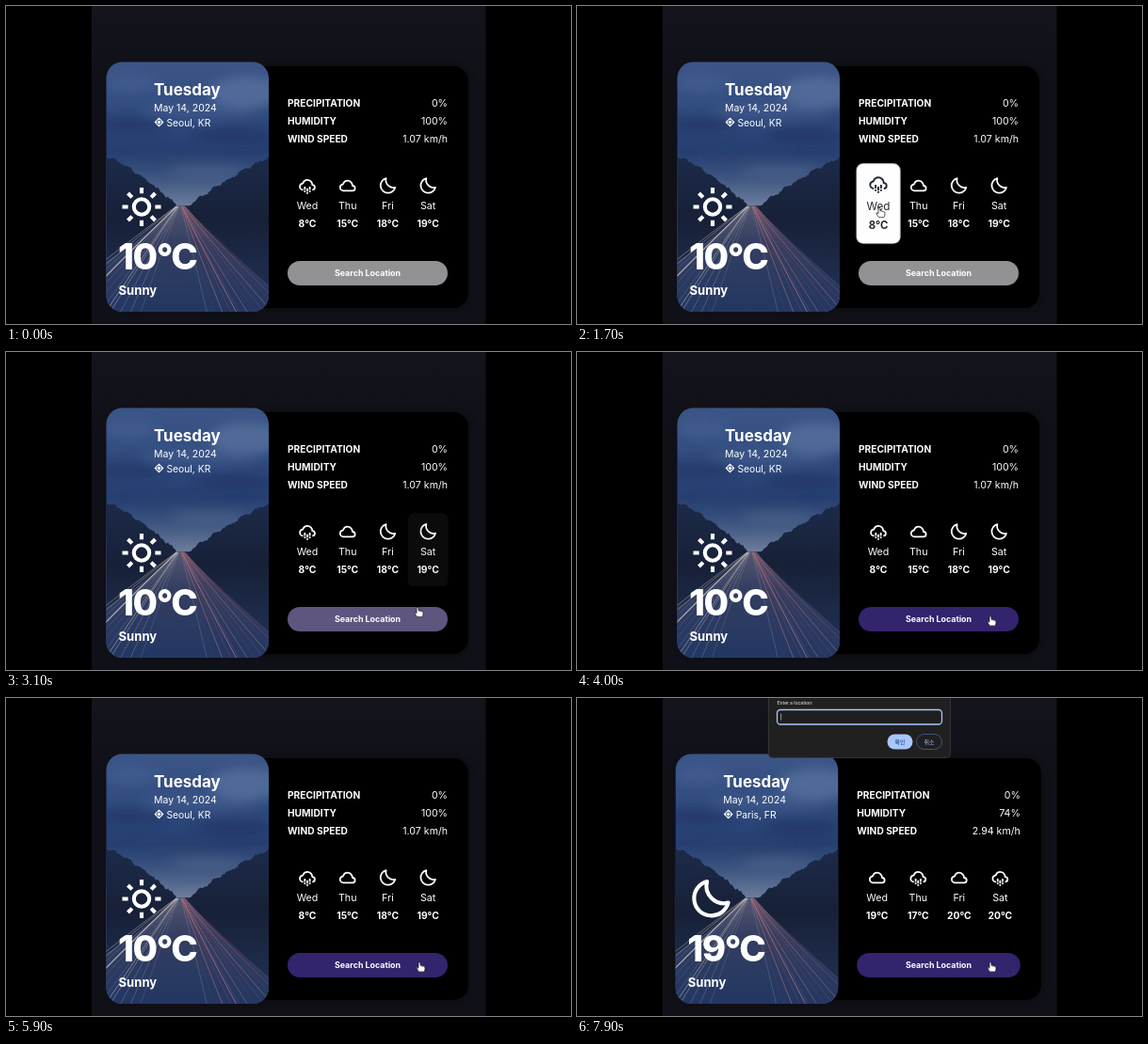
Write an HTML page that moves like this. It is 600 by 338 pixels and loops after 8000 ms.

```html
<!DOCTYPE html>
<html lang="en">
<head>
<meta charset="utf-8">
<title>Weather card</title>
<style>
html, body { margin: 0; width: 100%; height: 100%; overflow: hidden; background: #000; }
svg { display: block; width: 100vw; height: 100vh; font: 10.4px Inter, sans-serif; }
text { white-space: pre; }
.b { font-weight: 700; }
.mid { text-anchor: middle; }
.end { text-anchor: end; }
.icon { fill: none; stroke: currentColor; stroke-width: 2; stroke-linejoin: round; }
.dialog, .dialog text { font-family: Roboto, "Noto Sans CJK KR", "Noto Sans CJK", sans-serif; }

.before, .after, .dialog, .arrow, .hand { animation: 8s step-end infinite; }
.before { animation-name: before; }
.after { visibility: hidden; animation-name: after; }
.dialog { visibility: hidden; animation-name: dialog; }
.caret { animation: caret 8s step-end infinite; }
.key { visibility: hidden; animation: key 8s step-end var(--d) infinite; }
.before .card { transform-origin: 192.5px 192px; animation: grow 8s infinite; }
.before .item { animation: item 8s var(--d) infinite; }
.before .tile { animation: tile 8s var(--d) infinite; }
.tile { fill: #fff; opacity: 0; }
.before .button { animation: button 8s infinite; }
.button { fill: #34236d; }
.cursor { animation: move 8s linear infinite; }
.arrow { animation-name: arrow; }
.hand { animation-name: hand; }

@keyframes before { 0% { visibility: visible } 74.5%, 100% { visibility: hidden } }
@keyframes after { 0% { visibility: hidden } 74.5%, 100% { visibility: visible } }
@keyframes dialog {
  0% { visibility: hidden } 52.5% { visibility: visible }
  71% { visibility: hidden } 93.75%, 100% { visibility: visible }
}
@keyframes caret { 0% { opacity: 1 } 59.2% { opacity: 0 } 62.5%, 100% { opacity: 1 } }
@keyframes key { 0% { visibility: inherit } 10%, 100% { visibility: hidden } }
@keyframes grow { 0%, 2.5% { transform: none } 6.25%, 15.75% { transform: scale(1.078) } 19.5%, 100% { transform: none } }
@keyframes item {
  0% { transform: none; color: #fff }
  2.5%, 4.75% { transform: scale(1.1); color: #222831 }
  7.25%, 100% { transform: none; color: #fff }
}
@keyframes tile { 0% { opacity: 0 } 2.5%, 4.75% { opacity: 1 } 7.25%, 100% { opacity: 0 } }
@keyframes button { 0%, 37.6% { fill: #929295 } 41.3%, 100% { fill: #34236d } }
@keyframes arrow { 0% { visibility: hidden } 2% { visibility: visible } 18.5%, 100% { visibility: hidden } }
@keyframes hand { 0% { visibility: hidden } 18.5%, 100% { visibility: visible } }
@keyframes move {
  0%, 2% { transform: translate(226px, 160px) }
  8% { transform: translate(192px, 192px) }
  13.5% { transform: translate(204px, 205px) }
  16% { transform: translate(280px, 214px) }
  19% { transform: translate(317px, 214px) }
  21.25%, 22.5% { transform: translate(321px, 214px) }
  24% { transform: translate(345px, 217px) }
  28% { transform: translate(388px, 218px) }
  31.25% { transform: translate(438px, 217px) }
  35% { transform: translate(443px, 224px) }
  38.75% { transform: translate(437px, 271px) }
  44%, 100% { transform: translate(439px, 280.5px) }
}
</style>
</head>
<body>
<svg viewBox="0 0 600 338" fill="#fff" color="#fff">
  <defs>
    <linearGradient id="page" x2="0" y2="1"><stop stop-color="#14151c"/><stop offset=".25" stop-color="#101118"/><stop offset="1" stop-color="#101118"/></linearGradient>
    <linearGradient id="sky" x2="0" y2="1">
      <stop stop-color="#3c5587"/><stop offset=".16" stop-color="#344e81"/>
      <stop offset=".36" stop-color="#263f71"/><stop offset=".46" stop-color="#3c547f"/>
      <stop offset=".57" stop-color="#6b7c9b"/>
    </linearGradient>
    <linearGradient id="road" x2="0" y2="1"><stop stop-color="#545872"/><stop offset=".35" stop-color="#343e60"/><stop offset="1" stop-color="#223763"/></linearGradient>
    <linearGradient id="woods" x2="0" y2="1"><stop stop-color="#1c2b4a"/><stop offset=".4" stop-color="#172037"/><stop offset="1" stop-color="#22345a"/></linearGradient>
    <filter id="soft" x="-50%" y="-100%" width="200%" height="300%"><feGaussianBlur stdDeviation="6"/></filter>
    <filter id="shade" x="-20%" y="-20%" width="140%" height="140%"><feGaussianBlur stdDeviation="4"/></filter>
    <clipPath id="round"><rect x="106.5" y="59.5" width="172.5" height="265.5" rx="17"/></clipPath>
    <g id="photo" clip-path="url(#round)">
      <path fill="url(#sky)" d="M106 59h174v267H106z"/>
      <g filter="url(#soft)">
        <ellipse cx="256" cy="92" rx="40" ry="17" fill="#6480aa" opacity=".55"/>
        <ellipse cx="132" cy="82" rx="30" ry="9" fill="#4c669a" opacity=".45"/>
        <ellipse cx="205" cy="112" rx="60" ry="7" fill="#5470a0" opacity=".35"/>
        <ellipse cx="130" cy="126" rx="42" ry="9" fill="#1e3565" opacity=".6"/>
        <ellipse cx="242" cy="138" rx="42" ry="9" fill="#1d3565" opacity=".6"/>
        <ellipse cx="180" cy="160" rx="54" ry="5" fill="#2a4270" opacity=".55"/>
        <ellipse cx="215" cy="176" rx="40" ry="5" fill="#63779c" opacity=".45"/>
      </g>
      <path id="trees" fill="url(#woods)"/>
      <path fill="url(#road)" d="M181 212Q155 242 106 272V326H280V298Q215 243 190 212z"/>
      <g id="trails" fill="none"/>
    </g>
    <g id="sun" class="icon"><circle r="4"/><path id="rays"/></g>
    <path id="moon" class="icon" d="M-2-9A9 9 0 1 0 9 2A9 9 0 0 1-2-9z"/>
    <path id="cloud" class="icon" d="M-5 6A4 4 0 0 1-9 2C-9 .3-7.700-1.400-5.300-1.900C-4.600-4-2.500-6 0-6A6 6 0 0 1 6 0A3 3 0 0 1 6 6z"/>
    <path id="rain" class="icon" d="M-5 5A4 4 0 0 1-9 1C-9-.7-7.700-2.400-5.300-2.900C-4.600-5-2.500-7 0-7A6 6 0 0 1 6-1A3 3 0 0 1 6 5M-3 1v4m0 1v2M3 1v4m0 1v2M0 3v4m0 1v2"/>
  </defs>
  <path fill="#000" d="M0 0h600v338H0z"/>
  <path fill="url(#page)" d="M91 0h418.500v338H91z"/>
  <g id="scenes"></g>
  <g class="dialog">
    <rect x="203.500" y="-9" width="193" height="72.500" rx="4" fill="#202020" stroke="#3b3b3d" stroke-width=".8"/>
    <text x="212.500" y="7" font-size="5.300" fill="#e3e3e3">Enter a location:</text>
    <rect x="212.500" y="12.500" width="175" height="15.500" rx="3.500" fill="#1f1f1f" stroke="#a8c7fa" stroke-width="1.300"/>
    <g id="typed" font-size="5.800" fill="#e3e3e3"></g>
    <rect x="329.500" y="38.500" width="27" height="16" rx="8" fill="#a8c7fa"/>
    <text class="mid" x="343" y="48.800" font-size="6" fill="#062e6f">확인</text>
    <rect x="360.500" y="38.500" width="27" height="16" rx="8" fill="none" stroke="#47618c" stroke-width=".8"/>
    <text class="mid" x="374" y="48.800" font-size="6" fill="#a8c7fa">취소</text>
  </g>
  <g class="cursor" stroke="#111" stroke-width=".7" stroke-linejoin="round">
    <path class="arrow" d="M0 0V10L2.300 8L3.800 11.300L5.400 10.600L4 7.400H7z"/>
    <path class="hand" d="M-1 .9Q0-.5 1 .9V4Q2.200 3.200 3 4.400Q4.200 3.800 4.800 4.900Q6 4.600 6 6V8Q5.700 9.300 5 10.600H-.6Q-1.600 8.800-3 7Q-3.400 5.600-2 5.800L-1 6.700z"/>
  </g>
</svg>
<script>
const byId = id => document.getElementById(id);
const noise = n => { const s = Math.sin(n * 127.1) * 43758.5; return s - Math.floor(s); };

function drawPhoto() {
  let ridge = 'M106 326';
  for (let x = 106; x <= 280; x += 1.5) {
    const slope = x < 186
      ? 160 + 52 * ((x - 106) / 76) ** 1.3
      : 162 + 50 * (Math.max(0, 279 - x) / 85) ** 1.2;
    const bumps = Math.sin(x * .42) + (noise(x) - .5) * 2.5;
    ridge += `L${x} ${(Math.min(slope, 212) + bumps).toFixed(1)}`;
  }
  byId('trees').setAttribute('d', ridge + 'V326z');

  const trail = (x, bend, color, width, opacity) =>
    `<path d="M${185 + (x - 185) * .03} 213Q${185 + (x - 185) * bend} 250 ${x} 328" stroke="${color}" stroke-width="${width}" opacity="${opacity}"/>`;
  let lines = '';
  for (let i = 0; i < 11; i++) {
    const k = noise(i + 3);
    lines += trail(32 + i * 11, .36, ['#c9c0bc', '#8f8c98', '#7b88aa'][i % 3], .5 + k * .6, .2 + k * .35);
  }
  for (let i = 0; i < 11; i++) {
    const k = noise(i + 40);
    lines += trail(222 + i * 9, .32, ['#a8485c', '#b87078', '#7d3b58'][i % 3], .5 + k * .6, .25 + k * .4);
  }
  lines += trail(66, .36, '#dfd5ca', 1.2, .65) + trail(104, .36, '#d8cdc4', 1, .5);
  lines += trail(246, .32, '#c98a90', 1, .6) + trail(214, .36, '#7e8cad', .8, .45);
  byId('trails').innerHTML = lines;
}

function drawRays() {
  let d = '';
  for (let i = 0; i < 8; i++) {
    const c = Math.cos(i * Math.PI / 4), s = Math.sin(i * Math.PI / 4);
    d += `M${7 * c} ${7 * s}L${10 * c} ${10 * s}`;
  }
  byId('rays').setAttribute('d', d);
}

const days = ['Wed', 'Thu', 'Fri', 'Sat'];
const hoverAt = [1510, 1870, 2200, 2575];

function item([icon, temp], i, grow) {
  const x = 320 + i * 42.7 + grow * (i / 1.5 - 1) * .7;
  return `<g transform="translate(${x} 210)"><g class="item" style="--d:${hoverAt[i]}ms" fill="currentColor">
    <rect class="tile" x="-21.3" y="-38.7" width="42.6" height="77.4" rx="6.5"/>
    <use href="#${icon}" transform="translate(0 -19) scale(.88)"/>
    <text class="mid" y="6" font-size="10.7">${days[i]}</text>
    <text class="mid b" y="25" font-size="10.3">${temp}°C</text></g></g>`;
}

function scene({ name, grow, icon, temp, place, facts, week }) {
  const left = 299 - grow, right = 469 + grow;
  const labels = ['PRECIPITATION', 'HUMIDITY', 'WIND SPEED'];
  const rows = labels.map((label, i) =>
    `<text class="b" x="${left}" y="${107 + i * 19}" font-size="10.2">${label}</text>
     <text class="end" x="${right}" y="${107 + i * 19}" font-size="10.6">${facts[i]}</text>`).join('');
  const panel = `x="${110 - grow}" y="64" width="${381 + grow * 2}" height="257" rx="16" fill="#000"`;
  return `<g class="${name}">
    <rect ${panel} opacity=".45" filter="url(#shade)"/><rect ${panel}/>
    ${rows}${week.map((day, i) => item(day, i, grow)).join('')}
    <rect class="button" x="${left}" y="271" width="${right - left}" height="26" rx="13"/>
    <text class="mid b" x="384" y="287" font-size="8.9">Search Location</text>
    <g transform="translate(${-grow} 0)"><g class="card">
      <use href="#photo"/>
      <text class="b" x="157" y="94.500" font-size="17">Tuesday</text>
      <text x="157" y="112.300" font-size="10.5">May 14, 2024</text>
      <path d="M162.500 118.500l5 5-5 5-5-5z"/>
      <circle cx="162.500" cy="123.500" r="2.200" fill="none" stroke="#2c4679"/>
      <text x="170.500" y="128" font-size="10.3">${place}</text>
      <use href="#${icon}" transform="translate(144 213.500) scale(2.05)"/>
      <text x="119" y="279.500" font-size="38.500" font-weight="800" letter-spacing="-1.5">${temp}°C</text>
      <text class="b" x="119.500" y="307" font-size="13.1">Sunny</text>
    </g></g></g>`;
}

drawPhoto();
drawRays();
byId('scenes').innerHTML = scene({
  name: 'before', grow: 0, icon: 'sun', temp: 10, place: 'Seoul, KR',
  facts: ['0%', '100%', '1.07 km/h'],
  week: [['rain', 8], ['cloud', 15], ['moon', 18], ['moon', 19]]
}) + scene({
  name: 'after', grow: 1.8, icon: 'moon', temp: 19, place: 'Paris, FR',
  facts: ['0%', '74%', '2.94 km/h'],
  week: [['cloud', 19], ['rain', 17], ['cloud', 20], ['rain', 20]]
});

// Each typed prefix covers the one before it; the empty field keeps a bare caret.
const word = 'paris', firstKey = 5000, gap = 110;
let typed = '<path class="caret" d="M216.500 16.500h.6v7h-.6z"/>';
for (let i = 1; i <= word.length; i++) {
  typed += `<g class="key" style="--d:${firstKey + (i - 1) * gap}ms">
    <path fill="#1f1f1f" d="M215 15h40v10h-40z"/>
    <text x="216.500" y="22.300">${word.slice(0, i)}|</text></g>`;
}
byId('typed').innerHTML = typed;
</script>
</body>
</html>
```
